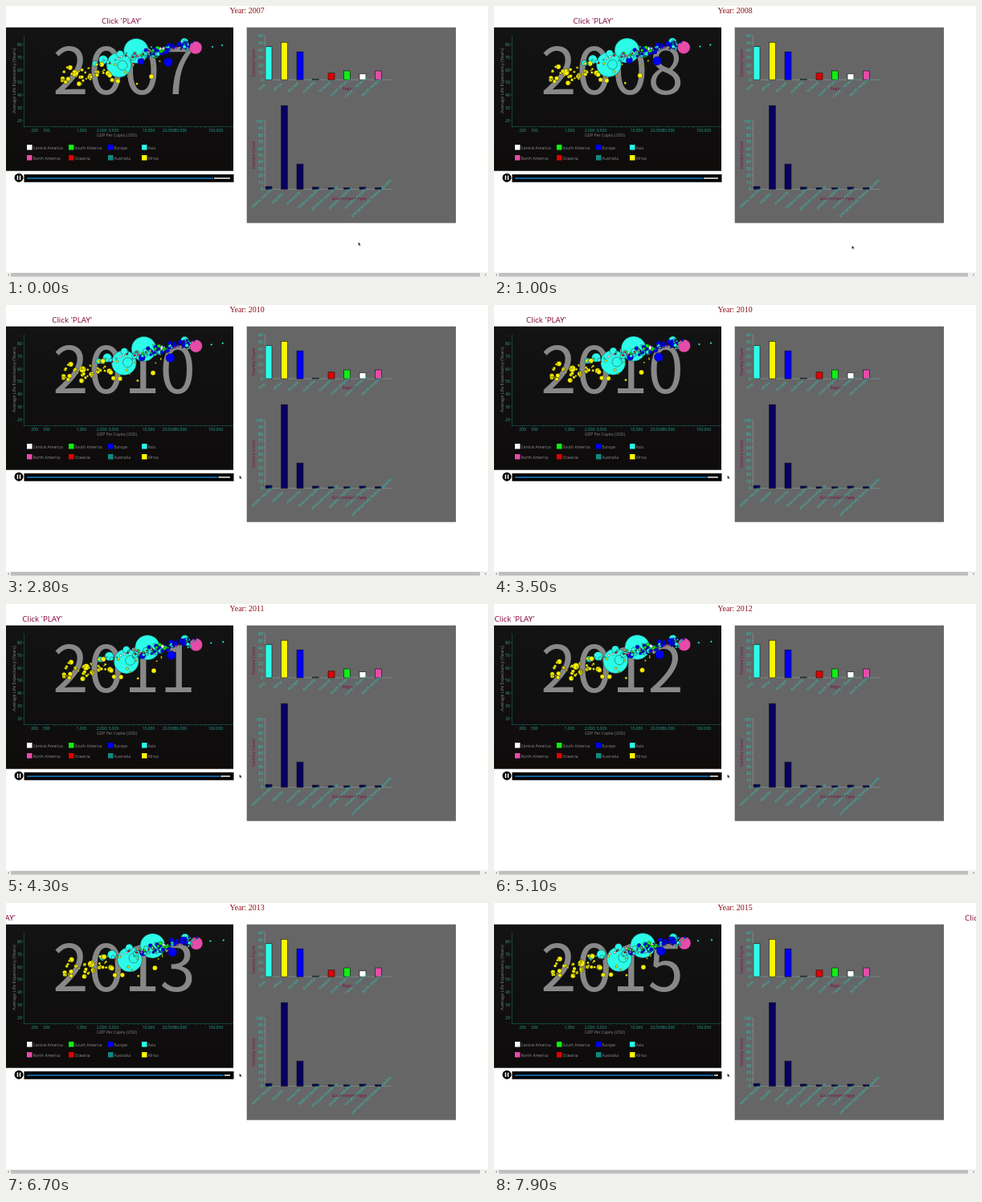
An HTML page with a canvas that plays this animation: 600x338 px, repeating every 8000 ms.

```html
<!DOCTYPE html>
<html lang="en">
<head>
<meta charset="utf-8">
<title>World statistics by year</title>
<style>
  html, body { margin: 0; width: 100%; height: 100%; overflow: hidden; background: #fff; }
  canvas { display: block; width: 600px; height: 338px; }
</style>
</head>
<body>
<canvas id="stage" width="600" height="338"></canvas>
<script>
const ctx = document.getElementById('stage').getContext('2d');
const LOOP = 8000;
const SANS = '"Open Sans", "Noto Sans", sans-serif';
const NARROW = '"Noto Sans CJK JP", "Noto Sans CJK SC", sans-serif';
const SERIF = '"Liberation Serif", serif';
const TEAL = '#22a594', MINT = '#32cbb9', PLUM = '#760a3e';
const COLORS = {
  central: '#ffffff', south: '#10f010', europe: '#0000f5', asia: '#2bfbe8',
  north: '#e64ba8', oceania: '#e00000', australia: '#0d8a83', africa: '#fdf500'
};

const lerp = (a, b, k) => a + (b - a) * k;

// Value at t along [time, value] stops
function along(stops, t) {
  for (let i = 1; i < stops.length; i++) {
    const [t0, a] = stops[i - 1], [t1, b] = stops[i];
    if (t <= t1) return lerp(a, b, (t - t0) / (t1 - t0));
  }
  return stops[stops.length - 1][1];
}

function rect(x, y, w, h, color) {
  ctx.fillStyle = color;
  ctx.fillRect(x, y, w, h);
}

function line(x0, y0, x1, y1, color, width = 0.6) {
  ctx.strokeStyle = color;
  ctx.lineWidth = width;
  ctx.beginPath();
  ctx.moveTo(x0, y0);
  ctx.lineTo(x1, y1);
  ctx.stroke();
}

function text(str, x, y, size, color, align = 'left', angle = 0, font = SANS) {
  ctx.save();
  ctx.translate(x, y);
  ctx.rotate(angle * Math.PI / 180);
  ctx.font = `${size}px ${font}`;
  ctx.textAlign = align;
  ctx.fillStyle = color;
  ctx.fillText(str, 0, 0);
  ctx.restore();
}

function disc(x, y, r, color) {
  ctx.beginPath();
  ctx.arc(x, y, r, 0, Math.PI * 2);
  ctx.fillStyle = color;
  ctx.fill();
}

// Bubbles: region, start x/y, end x/y, radius
const bubbles = [
  ['asia', 162, 56, 185.5, 53, 15.5],
  ['asia', 140.5, 73.5, 156, 70, 15.5],
  ['asia', 145, 74, 161, 68, 6],
  ['asia', 121, 67, 133.5, 64, 5.5],
  ['asia', 111, 72, 121, 67, 3.5],
  ['asia', 142, 60, 155, 55, 4.5],
  ['asia', 222, 45, 223, 43, 5],
  ['asia', 269, 49, 271, 46, 1.2],
  ['asia', 257, 51, 254, 47, 1.2],
  ['africa', 86, 84, 109, 75, 4.2],
  ['africa', 127, 84, 131, 80, 3.2],
  ['africa', 181, 88, 186, 80, 3],
  ['africa', 163, 97, 165, 90, 1.5],
  ['europe', 202, 70, 208, 60, 5.5],
  ['europe', 168, 69, 171, 61, 4],
  ['europe', 224, 49, 222, 47, 5],
  ['north', 236, 52, 237, 50, 8],
  ['central', 193.5, 55, 196, 54, 4],
  ['south', 186, 61, 196, 56, 4]
].map(([region, x0, y0, x1, y1, r]) => ({ region, x0, y0, x1, y1, r }));

let seed = 2007;
const rand = () => {
  seed = (seed * 16807) % 2147483647;
  return seed / 2147483647;
};

// Smaller countries follow a sloped band per region
function crowd(region, count, xMin, xMax, yMin, yMax, spread, rise, size) {
  for (let i = 0; i < count; i++) {
    const u = rand();
    const x0 = lerp(xMin, xMax, u);
    const y0 = lerp(yMin, yMax, u) + (rand() + rand() - 1) * spread;
    bubbles.push({
      region, x0, y0,
      x1: x0 + 2 + rand() * 6,
      y1: y0 - rise * (0.5 + rand()),
      r: 1 + size * rand() ** 2
    });
  }
}
crowd('africa', 44, 69, 140, 87, 83, 13, 5, 2.2);
crowd('africa', 6, 140, 192, 84, 66, 16, 4, 1);
crowd('asia', 30, 116, 236, 71, 47, 8, 2, 2.8);
crowd('europe', 24, 172, 232, 61, 46, 6, 2, 2.6);
crowd('south', 9, 160, 202, 62, 55, 6, 2, 2);
crowd('central', 5, 140, 192, 64, 55, 6, 2, 1);
crowd('north', 5, 160, 216, 61, 51, 6, 1, 0.6);
crowd('oceania', 4, 118, 178, 69, 61, 6, 2, 0.6);
crowd('australia', 1, 222, 222, 47, 47, 1, 1, 2);
bubbles.sort((a, b) => b.r - a.r);

const LEGEND = [
  ['Central America', 'central'], ['South America', 'south'], ['Europe', 'europe'], ['Asia', 'asia'],
  ['North America', 'north'], ['Oceania', 'oceania'], ['Australia', 'australia'], ['Africa', 'africa']
];

function bubbleChart(year, k) {
  const bg = ctx.createLinearGradient(0, 27, 0, 206);
  bg.addColorStop(0, '#131313');
  bg.addColorStop(1, '#0e0b0b');
  rect(0, 26.7, 283, 179, bg);
  text(year, 147, 110, 80, '#888', 'center', 0, NARROW);

  line(22.5, 37, 22.5, 151, '#1a635b');
  line(22, 150.5, 283, 150.5, '#1a635b');
  for (let v = 20; v <= 80; v += 10) {
    const y = 142.5 - (v - 20) * 1.57;
    line(21, y, 22.5, y, '#1a635b');
    text(v, 20, y + 2, 5.3, TEAL, 'right');
  }
  const gdpX = v => 94 + 83.5 * Math.log10(v / 1000);
  for (let d = 100; d <= 100000; d *= 10) {
    for (let m = 1; m < 10; m++) {
      const v = d * m, x = gdpX(v);
      if (x < 24 || x > 282) continue;
      line(x, 150.5, x, 152, '#1a635b');
      if (m <= 3 && v <= 100000) text(v.toLocaleString('en-US'), x, 157, 5.1, TEAL, 'center');
    }
  }
  text('GDP Per Capita (USD)', 138, 163, 5, '#858585', 'center');
  text('Average Life Expectancy (Years)', 12, 93, 5.6, '#858585', 'center', -90);

  for (const b of bubbles) {
    disc(lerp(b.x0, b.x1, k), lerp(b.y0, b.y1, k), b.r, COLORS[b.region]);
    ctx.strokeStyle = '#111';
    ctx.lineWidth = 0.4;
    ctx.stroke();
  }
  LEGEND.forEach(([label, region], i) => {
    const x = [26, 78, 127, 169][i % 4], y = i < 4 ? 173 : 186;
    rect(x, y, 6.5, 6.5, COLORS[region]);
    text(label, x + 7.5, y + 5.5, 5, '#8f8f8f');
  });
}

function player(t) {
  disc(16, 214.2, 5.5, '#000');
  rect(13.7, 211.5, 1.5, 5.4, '#fff');
  rect(16.8, 211.5, 1.5, 5.4, '#fff');
  rect(22.5, 210, 261, 9.7, '#000');
  const x = 258 + t * 0.0019;
  line(26, 214.8, x, 214.8, '#126bad', 1.7);
  line(x + 1, 214.8, 279, 214.8, '#e4e4e4', 1.6);
}

const barX = i => 327 + i * 19.5;

function barChart(o) {
  const { base, scale, max, step, values, labels, fills, labelY, title, titleY, countY } = o;
  const axis = '#7fa29c';
  line(322.5, base - max * scale, 322.5, base, axis);
  line(322, base, 480, base, axis);
  for (let v = 0; v <= max; v += step) {
    const y = base - v * scale;
    line(321, y, 322.5, y, axis);
    text(v, 320, y + 1.9, 5.4, MINT, 'right');
  }
  values.forEach((v, i) => {
    const x = barX(i) - 4, y = base - v * scale;
    rect(x, y, 8, v * scale, fills(i));
    ctx.strokeStyle = '#111';
    ctx.lineWidth = 0.6;
    ctx.strokeRect(x, y, 8, v * scale);
  });
  text(title, 427, titleY, 5.2, PLUM, 'center');
  text('Country Count', 310, countY, 5.1, PLUM, 'center', -90);
  labels.forEach((s, i) => text(s, barX(i) - 7.4, labelY + 1, 4.8, MINT, 'center', -43));
}

const regionOrder = ['asia', 'africa', 'europe', 'australia', 'oceania', 'south', 'central', 'north'];
const regionChart = {
  base: 92, scale: 0.917, max: 60, step: 10,
  values: [45, 51, 38, 1, 9, 12, 8, 12],
  labels: ['Asia', 'Africa', 'Europe', 'Australia', 'Oceania', 'South America', 'Central America', 'North America'],
  fills: i => COLORS[regionOrder[i]],
  labelY: 101, title: 'Region', titleY: 105, countY: 71
};
const governmentChart = {
  base: 228.5, scale: 0.848, max: 100, step: 10,
  values: [4, 123, 37, 3, 2, 2, 3, 2],
  labels: ['islamic republic', 'republic', 'monarchy', 'federal republic', 'absolute monarchy',
    "people's republic", 'socialist republic', 'parliamentary federal republic'],
  fills: () => '#08005e',
  labelY: 239.5, title: 'Government Type', titleY: 241.8, countY: 186
};

function scrollbar() {
  rect(0, 332, 600, 6, '#f1f1f1');
  rect(6, 333, 584, 4.5, '#bebebe');
  for (const [x, d] of [[2, 1], [598, -1]]) {
    ctx.beginPath();
    ctx.moveTo(x, 335.2);
    ctx.lineTo(x + 1.6 * d, 333.7);
    ctx.lineTo(x + 1.6 * d, 336.7);
    ctx.fillStyle = '#888';
    ctx.fill();
  }
}

const cursorX = [[0, 438.6], [600, 442], [1000, 445.6], [1300, 448], [1850, 290.6]];
const cursorY = [[0, 294.6], [600, 298], [1000, 298.8], [1300, 302], [1850, 212.6]];

function cursor(t) {
  ctx.save();
  ctx.translate(along(cursorX, t), along(cursorY, t));
  ctx.beginPath();
  [[0, 0], [0, 4.3], [1, 3.4], [1.7, 5], [2.4, 4.7], [1.7, 3.1], [3, 3]].forEach(p => ctx.lineTo(...p));
  ctx.closePath();
  ctx.fillStyle = '#111';
  ctx.fill();
  ctx.strokeStyle = '#fff';
  ctx.lineWidth = 0.25;
  ctx.stroke();
  ctx.restore();
}

const marquee = [[0, 119], [1000, 98.5], [2200, 72], [3500, 40], [5100, 0.5], [6700, -38], [7250, -52]];

function draw(t) {
  const year = String(Math.floor(2007.2 + t / 1000));
  const u = t / LOOP;
  rect(0, 0, 600, 338, '#fff');
  text('Year: ' + year, 300, 9, 9.9, '#8b0a14', 'center', 0, SERIF);
  const x = t < 7250 ? along(marquee, t) : 600 - (t - 7250) * 0.0215;
  text("Click 'PLAY'", x, 22, 9.8, '#800038');
  bubbleChart(year, u * (1.25 - 0.25 * u)); // growth slows slightly
  player(t);
  rect(299.7, 26.7, 260.3, 244, '#666');
  barChart(regionChart);
  barChart(governmentChart);
  scrollbar();
  cursor(t);
}

const start = performance.now();
function tick() {
  draw((performance.now() - start) % LOOP);
  requestAnimationFrame(tick);
}
tick();
</script>
</body>
</html>
```
